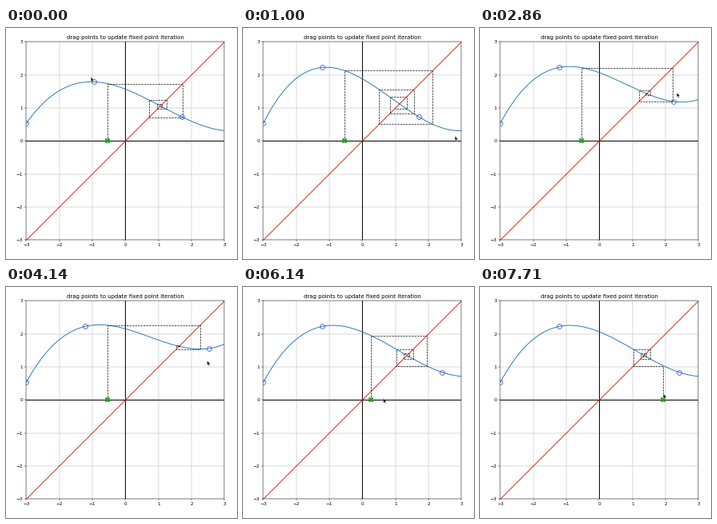
These frames come from a looping animation (289 px wide and 289 px high, 8000 ms). A matplotlib script:

```python
import numpy as np
import matplotlib.pyplot as plt
from matplotlib.animation import FuncAnimation
from matplotlib.patches import Polygon

SIZE = 289
LEFT, TOP, SIDE = 25.4, 17.4, 248
UNIT = SIDE / 6            # pixels per data unit
LOOP, INTERVAL = 8000, 50
RATE = 7                   # redraws per second
DEPTH = 6                  # iterations drawn
PT = 5 / 12                # scale for point sizes

# Mouse path: step, x, y. A held handle trails it by one step.
MOUSE = np.array([
    (-1, -0.955, 1.79), (2, -1.222, 2.226),       # drag the peak
    (7, 2.8, 0.15), (8, 1.718, 0.726),            # overshoot, grab the dip
    (15, 2.36, 2.55), (19, 2.238, 1.198),
    (22, 2.55, 2.0), (28, 2.53, 1.56),
    (30, 2.42, 0.82), (33, 2.42, 0.847),          # let go
    (40, -0.53, 0.02), (47.5, 2.38, 0.1), (53, 1.936, 0.19)])
ARROW = np.array([(0, 0), (0, 5.6), (1.3, 4.5), (2.2, 6.5),
                  (3.1, 6.1), (2.2, 4.2), (3.9, 4.2)]) * (1, -1) / UNIT


def mouse(step):
    steps, x, y = MOUSE.T
    return np.array([np.interp(step, steps, x), np.interp(step, steps, y)])


def held(step, grab, drop):
    """Position of a handle dragged between two steps of the mouse path."""
    return mouse(np.clip(step - 1, grab, drop))


def cobweb(f, x):
    path = [(x, 0)]
    for _ in range(DEPTH):
        y = f(x)
        path += [(x, y), (y, y)]
        x = y
    return np.array(path)


fig = plt.figure(figsize=(SIZE / 100, SIZE / 100), dpi=100, facecolor="white")
ax = fig.add_axes([LEFT / SIZE, 1 - (TOP + SIDE) / SIZE, SIDE / SIZE, SIDE / SIZE])
ax.set(xlim=(-3, 3), ylim=(-3, 3), xticks=range(-3, 4), yticks=range(-3, 4))
ax.set_title("drag points to update fixed point iteration",
             fontsize=12 * PT, pad=6 * PT)
ax.tick_params(labelsize=10 * PT, length=3.5 * PT, width=0.8 * PT, pad=3.5 * PT)
ax.grid(color="#b0b0b0", linewidth=0.8 * PT)
for spine in ax.spines.values():
    spine.set_linewidth(0.8 * PT)

width = 1.6 * PT
ax.axhline(0, color="black", lw=width)
ax.axvline(0, color="black", lw=width)
curve, = ax.plot([], [], color="#1f77b4", lw=width)
ax.plot([-3, 3], [-3, 3], color="#dc1c08", lw=width)
web, = ax.plot([], [], "--", color="black", lw=1.15 * PT)
handles, = ax.plot([], [], "o", ms=10 * PT, mfc="none", mec="#2040d0",
                   mew=1.2 * PT, zorder=4)
seed, = ax.plot([], [], "X", ms=11 * PT, mfc="#22aa22", mec="#147a14",
                mew=0.4 * PT, zorder=4)
pointer = ax.add_patch(Polygon(ARROW, fc="black", ec="white",
                               lw=0.5 * PT, zorder=6, clip_on=False))
grid_x = np.linspace(-3, 3, 200)


def draw(i):
    step = int(i * INTERVAL * RATE / 1000 + 0.32)
    px, py = held(step, -1, 2)
    dx, dy = held(step, 8, 32)
    x0 = held(step, 40, 53)[0]

    # the right end tilts up as the dip is raised
    end = dy + 0.79 * np.log(dy / 1.09) * (3 - dx)
    knots_x = [-3, px, dx, 3]
    knots_y = [0.535, py, dy, end]
    f = np.poly1d(np.polyfit(knots_x, knots_y, 3))

    curve.set_data(grid_x, f(grid_x))
    web.set_data(*cobweb(f, x0).T)
    handles.set_data(knots_x[:3], knots_y[:3])
    seed.set_data([x0], [0])
    pointer.set_xy(ARROW + mouse(step))
    return curve, web, handles, seed, pointer


anim = FuncAnimation(fig, draw, frames=LOOP // INTERVAL, interval=INTERVAL,
                     repeat=True, repeat_delay=0)
plt.show()
```
